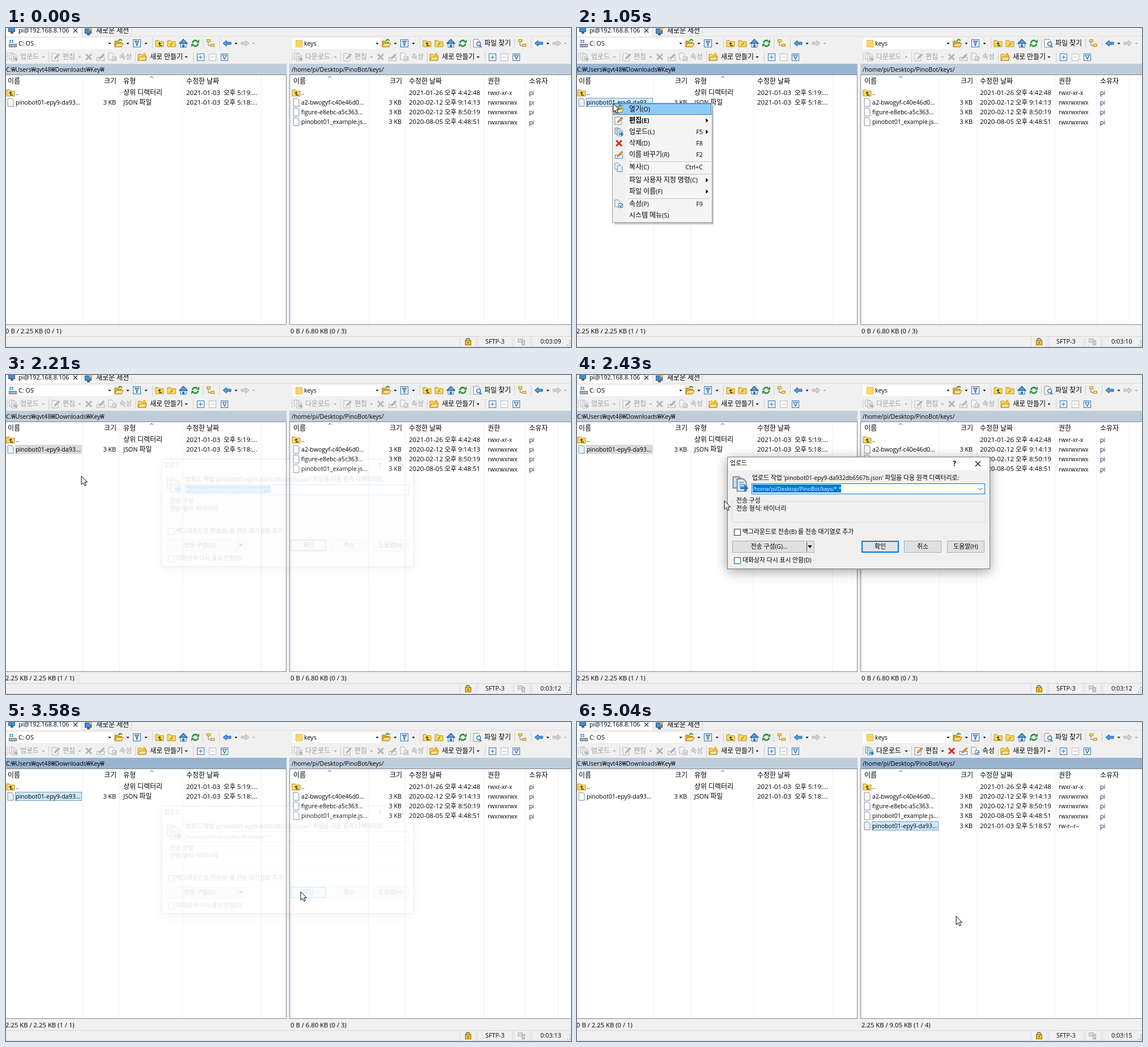
An HTML page with a canvas that plays this animation: 997x562 px, repeating every 5120 ms.

```html
<!DOCTYPE html>
<html lang="ko">
<head>
<meta charset="utf-8">
<title>File transfer</title>
<style>
html, body { margin: 0; width: 100%; height: 100%; overflow: hidden; background: #f0f0f0; }
canvas { display: block; }
</style>
</head>
<body>
<canvas id="stage" width="997" height="562"></canvas>
<script>
const W = 997, H = 562, LOOP = 5120;
const screen2d = document.getElementById('stage').getContext('2d');
const layer = document.createElement('canvas');
layer.width = W; layer.height = H;
const layer2d = layer.getContext('2d');
let g = screen2d;
let disabled = false;

const LATIN = '"Open Sans", "Noto Sans", sans-serif';
const HANGUL = '"Noto Sans CJK KR", "Noto Sans CJK", sans-serif';
const NAME = 'pinobot01-epy9-da93...';
const EDGE = '#828790';

// ---------- primitives ----------
const tone = c => disabled ? '#b4b4b4' : c;

function rect(x, y, w, h, fill, line) {
  if (fill) { g.fillStyle = fill; g.fillRect(x, y, w, h); }
  if (line) { g.strokeStyle = line; g.lineWidth = 1; g.strokeRect(x + .5, y + .5, w - 1, h - 1); }
}

function path(points, fill, line, width = 1, open = false) {
  g.beginPath();
  for (let i = 0; i < points.length; i += 2) g.lineTo(points[i], points[i + 1]);
  if (!open) g.closePath();
  if (fill) { g.fillStyle = fill; g.fill(); }
  if (line) { g.strokeStyle = line; g.lineWidth = width; g.stroke(); }
}

// Hangul and Latin runs use their own sizes; y is the middle of the line.
function text(s, x, y, { latin = 10.8, hangul = 12, color = '#000', align = 'left', bold = false } = {}) {
  const runs = (s.match(/[가-힣]+|[^가-힣]+/g) || []).map(run => {
    const korean = /[가-힣]/.test(run);
    const font = `${bold ? 'bold ' : ''}${korean ? hangul : latin}px ${korean ? HANGUL : LATIN}`;
    g.font = font;
    return { run, font, width: g.measureText(run).width };
  });
  const total = runs.reduce((sum, r) => sum + r.width, 0);
  if (align === 'right') x -= total;
  if (align === 'center') x -= total / 2;
  g.fillStyle = color;
  for (const r of runs) {
    g.font = r.font;
    g.fillText(r.run, x, y + 4);
    x += r.width;
  }
}

function at(x, y, draw, ...args) {
  g.save();
  g.translate(x, y);
  draw(...args);
  g.restore();
}

// ---------- icons, drawn around their centre ----------
const down = () => path([-2.5, -1, 2.5, -1, 0, 2], tone('#111'));
const side = () => path([-1.5, -4, 2.5, 0, -1.5, 4], '#000');

function folder(mark) {
  path([-7, -5, -2, -5, 0, -3, 7, -3, 7, 6, -7, 6], tone('#ffd95c'), tone('#b98a16'));
  if (mark === 'up') {
    path([-3, 1, 0, -2, 3, 1], tone('#333'));
    path([0, 1, 0, 4, 4, 4], null, tone('#333'), 1.3, true);
  }
  if (mark === 'root') path([-2, 4, 2, -1], null, tone('#555'), 1.2, true);
}

function openFolder() {
  path([-7, -4, -3, -4, -1, -2, 5, -2, 5, 6, -7, 6], tone('#e0ac2a'), tone('#a97a10'));
  path([-7, 6, -4, 0, 8, 0, 5, 6], tone('#ffe27d'), tone('#a97a10'));
  path([-1, -4, 2, -7, 6, -5], null, tone('#3f9b35'), 2.2, true);
}

function newFolder() {
  folder();
  path([-7, 6, -4, 0, 8, 0, 6, 6], tone('#ffe58a'), tone('#a97a10'));
  rect(2, -7, 4, 4, tone('#ffae1a'));
}

function filterBox() {
  rect(-7, -7, 14, 14, '#f4f9ff', '#2670b5');
  path([-4, -4, 4, -4, 1, 0, 1, 4, -1, 4, -1, 0], '#8eb8dc', '#305a86');
}

function home() {
  path([-5, 0, -5, 7, 5, 7, 5, 0], '#eaf4ff', '#2e6eac');
  path([-7, 0, 0, -7, 7, 0], '#62a4df', '#205c98', 1.3);
  rect(-2, 2, 4, 5, '#3b78b5');
}

function refresh() {
  for (const turn of [0, Math.PI]) {
    g.save();
    g.rotate(turn);
    g.beginPath();
    g.arc(0, 0, 5, Math.PI * 1.02, Math.PI * 1.75);
    g.strokeStyle = '#289538';
    g.lineWidth = 2.8;
    g.stroke();
    path([2, -1, 7, -1, 7, -7], '#289538');
    g.restore();
  }
}

function tree() {
  path([-4, -2, -4, 4, 2, 4], null, '#777', 1, true);
  rect(-7, -7, 7, 5, '#ffd95c', '#b98a16');
  rect(0, 1, 7, 5, '#ffd95c', '#b98a16');
}

function arrow(dir, live) {
  const p = [-7, 0, -1, -5, -1, -2, 7, -2, 7, 2, -1, 2, -1, 5];
  path(p.map((v, i) => i % 2 ? v : v * dir), live ? '#4b9be6' : '#d3d3d3', live ? '#1c5d9f' : '#b5b5b5');
}

function page(x = -5, y = -7, w = 11, h = 14, fill = '#fff') {
  path([x, y, x + w - 3, y, x + w, y + 3, x + w, y + h, x, y + h], disabled ? '#f4f4f4' : fill, tone('#7b8591'));
}

function transfer() {
  page(-7, -7, 9, 11, '#c4dff6');
  page(-3, -5, 9, 12, '#dcedfb');
  for (const y of [-2, 0, 2]) rect(-1, y, 5, 1, tone('#6ea3d2'));
  path([0, 3, 4, 3, 4, 0, 8, 4, 4, 8, 4, 5, 0, 5], tone('#2477c3'));
}

function pencil(small) {
  if (small) rect(-7, 0, 14, 7, disabled ? '#eee' : '#fff', tone('#4b83b8'));
  else page(-7, -6, 11, 13);
  path([-3, 4, -2, 1, 5, -6, 7, -4, 0, 3], tone('#f2a03d'), tone('#845421'), .8);
}

function cross() {
  path([-5, -5, 5, 5], null, tone('#d52b1e'), 3, true);
  path([5, -5, -5, 5], null, tone('#d52b1e'), 3, true);
}

function props() {
  page(-7, -7, 9, 12);
  rect(-1, -1, 8, 8, disabled ? '#eee' : '#fff', tone('#4778a8'));
  path([1, 3, 3, 5, 6, 1], null, tone('#2c66a3'), 1.3, true);
}

function signBox(sign) {
  const c = sign === '-' ? '#b9b9b9' : '#2d72b3';
  rect(-6, -6, 13, 13, '#fafdff', c);
  if (sign === 'v') path([-3, -3, 4, -3, .5, 4], null, '#1c5591', 1.2);
  else rect(-3, 0, 7, 1, c);
  if (sign === '+') rect(0, -3, 1, 7, c);
}

function monitor() {
  rect(-7, -6, 12, 9, '#3f8fd8', '#34506b');
  rect(-3, 3, 5, 3, '#56656f');
}

function find() {
  page(-7, -7, 11, 14);
  g.beginPath();
  g.arc(2, 1, 3.6, 0, 7);
  g.fillStyle = '#cfe7fb';
  g.fill();
  g.strokeStyle = '#376a99';
  g.lineWidth = 1.3;
  g.stroke();
  path([4, 4, 7, 7], null, '#376a99', 2, true);
}

function pointer(x, y) {
  path([x, y, x, y + 15, x + 3.5, y + 11.8, x + 6, y + 17, x + 8.3, y + 16, x + 6, y + 10.8, x + 10.5, y + 10.8], '#fff', '#000', 1);
}

// ---------- window ----------
const gap = (x, y) => rect(x, y - 9, 1, 18, '#cfcfcf');

function tabs() {
  rect(0, 0, 133, 14, '#fff');
  rect(133, 0, 1, 14, '#d4d4d4');
  rect(221, 0, 1, 14, '#d4d4d4');
  rect(134, 14, W - 134, 1, '#dedede');
  at(11, 4, monitor);
  text('pi@192.168.8.106', 22, 4);
  path([119, 1, 126, 8], null, '#222', 1.1, true);
  path([126, 1, 119, 8], null, '#222', 1.1, true);
  at(146, 7, monitor);
  rect(147, 0, 5, 4, '#f5b63a');
  text('새로운 세션', 159, 5);
}

function navBar(dx, right) {
  const y = 27, late = right ? 550 : 0;
  rect(right ? 505 : 0, 18, right ? 156 : 189, 19, '#fff');
  if (right) {
    rect(511, 21, 12, 13, '#ffd567', '#eab73c');
    text('keys', 526, y);
  } else {
    rect(5, 28, 14, 6, '#a7adb4', '#6d747b');
    for (let i = 0; i < 4; i++) rect(6 + i % 2 * 4, 21 + (i >> 1) * 3, 3, 2, '#2790e0');
    text('C: OS', 22, y);
  }
  at(183 + dx, y, down);
  at(199 + dx, y, openFolder);
  at(215 + dx, y, down);
  at(231 + dx, y, filterBox);
  at(247 + dx, y, down);
  gap(258 + dx, y);
  at(271 + dx, y, folder, 'up');
  at(292 + dx, y, folder, 'root');
  at(313 + dx, y, home);
  at(334 + dx, y, refresh);
  gap(347 + dx, y);
  if (right) {
    at(832, y, find);
    text('파일 찾기', 844, y);
    gap(897, y);
  }
  at(361 + late, y, tree);
  gap(376 + late, y);
  at(390 + late, y, arrow, 1, true);
  at(406 + late, y, down);
  at(422 + late, y, arrow, -1, false);
  disabled = true;
  at(437 + late, y, down);
  disabled = false;
}

function actionBar(dx, right, live) {
  const y = 51, base = right ? 503 : 0;
  for (let i = 0; i < 5; i++) rect(base + 1, 44 + i * 3, 2, 1, '#b8b8b8');
  disabled = !live;
  const color = live ? '#000' : '#9d9d9d';
  at(base + 13, y, transfer);
  text(right ? '다운로드' : '업로드', base + 25, y, { color });
  at(right ? 581 : 66, y, down);
  gap(75 + dx, y);
  at(88 + dx, y, pencil);
  text('편집', 100 + dx, y, { color });
  at(130 + dx, y, down);
  at(146 + dx, y, cross);
  at(167 + dx, y, pencil, true);
  at(188 + dx, y, props);
  text('속성', 200 + dx, y, { color });
  disabled = false;
  gap(228 + dx, y);
  at(240 + dx, y, newFolder);
  text('새로 만들기', 254 + dx, y);
  at(318 + dx, y, down);
  gap(330 + dx, y);
  at(343 + dx, y, signBox, '+');
  at(364 + dx, y, signBox, '-');
  at(385 + dx, y, signBox, 'v');
}

function pathBar(x, w, label, active) {
  rect(x, 63, w, 20, active ? '#99b4d1' : '#bfcddb');
  text(label, x ? 504 : 0, 73, { latin: 10.6 });
}

function marked(x, y, style) {
  const fill = { hover: '#e5f3ff', active: '#cce8ff', idle: '#d9d9d9' }[style];
  if (!fill) return;
  rect(x, y - 8, 118, 16, fill);
  if (style !== 'active') return;
  g.setLineDash([1, 1]);
  rect(x, y - 8, 118, 16, null, '#24506f');
  g.setLineDash([]);
}

function listFrame(x, w, columns, caret) {
  rect(x, 82, w, 441, '#fff');
  for (const c of columns) rect(c, 83, 1, 438, '#eaf2f9');
  rect(x, 82, w, 1, EDGE);
  rect(x, 522, w, 1, EDGE);
  path([caret - 3, 88, caret, 85, caret + 3, 88], null, '#555', 1, true);
}

function fileRow(y, name, date, x, style) {
  const right = x > 400;
  marked(x + 13, y, style);
  at(x + 5, y, page, -5, -7, 10, 14, style ? '#e4f2fd' : '#fff');
  text(name, x + 14, y, { latin: 10.6 });
  text('3 KB', right ? 698 : 194, y, { align: 'right' });
  text(date, right ? 711 : 318, y, { latin: 11.5, hangul: 11.4 });
}

function leftList(style) {
  listFrame(0, 495, [135, 200, 311, 450], 257);
  rect(494, 82, 1, 441, EDGE);
  text('이름', 3, 94);
  text('크기', 195, 94, { align: 'right' });
  text('유형', 207, 94);
  text('수정한 날짜', 318, 94);
  at(8, 114, folder, 'up');
  text('..', 17, 114);
  text('상위 디렉터리', 207, 114);
  text('2021-01-03  오후 5:19:...', 318, 114, { latin: 11.5, hangul: 11.4 });
  fileRow(131, NAME, '2021-01-03  오후 5:18:...', 3, style);
  text('JSON 파일', 207, 131);
}

function rightList(arrived, style) {
  listFrame(500, W - 500, [502, 639, 704, 843, 916, 974], 571);
  rect(500, 82, 1, 441, EDGE);
  rect(502, 106, 1, 415, '#d5e7f6');
  text('이름', 507, 94);
  text('크기', 699, 94, { align: 'right' });
  text('수정한 날짜', 711, 94);
  text('권한', 850, 94);
  text('소유자', 923, 94);
  at(512, 114, folder, 'up');
  text('..', 521, 114);
  text('2021-01-26 오후 4:42:48', 711, 114, { latin: 11.5, hangul: 11.4 });
  const files = [
    ['a2-bwogyf-c40e46d0...', '2020-02-12 오후 9:14:13'],
    ['figure-e8ebc-a5c363...', '2020-02-12 오후 8:50:19'],
    ['pinobot01_example.js...', '2020-08-05 오후 4:48:51']
  ];
  if (arrived) files.push([NAME, '2021-01-03 오후 5:18:57']);
  files.forEach(([name, date], i) => fileRow(131 + i * 17.4 | 0, name, date, 507, i === 3 && style));
  const rights = ['rwxr-xr-x', ...files.map((f, i) => i < 3 ? 'rwxrwxrwx' : 'rw-r--r--')];
  rights.forEach((r, i) => {
    const y = 114 + i * 17.4 | 0;
    text(r, 850, y, { latin: 10.2 });
    text('pi', 923, y, { color: '#281540' });
  });
}

function statusBar(clock) {
  rect(0, 543, W, 1, '#d7d7d7');
  for (const x of [801, 829, 832, 893, 896, 924, 927]) rect(x, 545, 1, 16, '#dadada');
  rect(0, 561, W, 1, '#dcdcdc');
  g.beginPath();
  g.arc(815, 550, 3, Math.PI, 0);
  g.strokeStyle = '#8a7440';
  g.lineWidth = 1.8;
  g.stroke();
  rect(810, 550, 11, 9, '#f3b62d', '#9c6c0d');
  rect(815, 553, 1, 3, '#704c08');
  text('SFTP-3', 846, 552);
  rect(903, 547, 9, 7, '#d9d9d9', '#b0b0b0');
  rect(910, 550, 6, 9, '#d0d0d0', '#a9a9a9');
  text('0:03:' + String(clock).padStart(2, '0'), 943, 552);
  for (let i = 0; i < 3; i++) rect(994, 550 + i * 4, 2, 2, '#b5b5b5');
  rect(990, 558, 2, 2, '#b5b5b5');
}

// ---------- context menu ----------
const MENU = [
  [143, '열기(O)', '', openFolder],
  [163, '편집(E)', '>', pencil],
  [183, '업로드(L)', 'F5>', transfer],
  [203, '삭제(D)', 'F8', cross],
  [223, '이름 바꾸기(R)', 'F2', () => pencil(true)],
  [245, '복사(C)', 'Ctrl+C', () => { page(-7, -7, 9, 11); page(-3, -3, 9, 11, '#dcecfb'); }],
  [268, '파일 사용자 지정 명령(C)', '>'],
  [288, '파일 이름(F)', '>'],
  [310, '속성(P)', 'F9', props],
  [330, '시스템 메뉴(S)', '']
];

function contextMenu(pointerY) {
  rect(66, 136, 175, 210, 'rgba(0,0,0,.22)');
  rect(62, 132, 177, 211, '#f5f5f5', '#9b9b9b');
  rect(64, 134, 22, 207, '#f0f0f0');
  for (const y of [235, 257, 300]) rect(90, y, 146, 1, '#c9c9c9');
  for (const [y, label, extra, icon] of MENU) {
    const key = extra.replace('>', '');
    if (Math.abs(pointerY - y) <= 10) {
      rect(64, y - 10, 173, 20, '#91c9f7', '#2685cf');
      if (extra === 'F5>') rect(224, y - 9, 1, 18, '#2685cf');
    }
    if (icon) at(74, y, icon);
    text(label, 92, y, { bold: y === 163 });
    if (key) text(key, 222, y, { align: 'right' });
    if (extra.endsWith('>')) at(229, y, side);
  }
}

// ---------- upload dialog ----------
const SMALL = { latin: 10.2, hangul: 10.9 };

function button(x, w, label, edge = '#adadad', fill = '#e1e1e1') {
  rect(x, 292, w, 21, fill, edge);
  if (edge !== '#adadad') rect(x + 1, 293, w - 2, 19, null, edge);
  text(label, x + w / 2, 302, { ...SMALL, align: 'center' });
}

function checkbox(y, label, edge) {
  rect(277, y - 6, 12, 12, '#fff', edge);
  text(label, 292, y - 1, SMALL);
}

function dialog(closing, pressed) {
  g.save();
  g.shadowColor = 'rgba(0,0,0,.38)';
  g.shadowBlur = 20;
  g.shadowOffsetY = 4;
  rect(265, 144, 464, 198, '#f0f0f0');
  g.restore();
  rect(265, 144, 464, 198, '#f0f0f0', '#787878');
  rect(266, 145, 462, 23, '#fff');
  text('업로드', 270, 155, SMALL);
  text('?', 666, 156, { latin: 12, align: 'center', bold: true });
  path([703, 152, 712, 161], null, '#111', 1.2, true);
  path([712, 152, 703, 161], null, '#111', 1.2, true);
  g.save();
  g.translate(288, 192);
  g.scale(1.8, 1.8);
  transfer();
  g.restore();
  text("업로드 작업 'pinobot01-epy9-da932db6567b.json' 파일을 다음 원격 디렉터리로:", 309, 181, SMALL);
  rect(308, 191, 412, 19, '#fff', closing ? '#9a9a9a' : '#0078d7');
  if (!closing) rect(310, 193, 156, 14, '#0078d7');
  text('/home/pi/Desktop/PinoBot/keys/*.*', 310, 200, { latin: 9.4, color: closing ? '#000' : '#fff' });
  path([708, 199, 711.5, 202.5, 715, 199], null, '#444', 1, true);
  rect(273, 222, 448, 38, null, '#dcdcdc');
  rect(279, 220, 46, 4, '#f0f0f0');
  text('전송 구성', 281, 221, SMALL);
  text('전송 형식: 바이너리', 281, 235, SMALL);
  checkbox(277, '백그라운드로 전송(B) 를 전송 대기열로 추가', '#333');
  checkbox(327, '대화상자 다시 표시 안함(D)', '#1c5a96');
  button(274, 145, '');
  text('전송 구성(G)...', 339, 302, { ...SMALL, align: 'center' });
  rect(405, 294, 1, 17, '#555');
  path([407, 300, 415, 300, 411, 305], '#111');
  button(502, 66, '확인', '#0078d7', pressed ? '#cce4f7' : '#e1e1e1');
  button(577, 66, '취소');
  button(653, 66, '도움말(H)');
}

function fadedDialog(amount, closing, pressed) {
  g = layer2d;
  g.clearRect(0, 0, W, H);
  dialog(closing, pressed);
  g = screen2d;
  const scale = .955 + .045 * amount;
  g.save();
  g.globalAlpha = amount;
  g.translate(497, 243);
  g.scale(scale, scale);
  g.drawImage(layer, -497, -243);
  g.restore();
}

// ---------- timeline ----------
const ROUTE = [
  [70, 150, 330], [560, 64, 133], [1130, 64, 133], [1350, 120, 204], [1430, 140, 186],
  [1510, 136, 175], [1660, 133, 178], [2210, 133, 178], [2290, 205, 205], [2810, 510, 297],
  [3040, 519, 302], [3400, 520, 299], [3860, 520, 299], [4260, 600, 188], [4660, 600, 181], [5040, 669, 342]
];
const CLICKS = [[620, 800], [960, 1050], [1820, 1890], [3270, 3420], [4340, 4480]];
const TICKS = [140, 1110, 2110, 3030, 4040, 4980];
const clamp = v => Math.max(0, Math.min(1, v));

function pointerAt(t) {
  const i = ROUTE.findIndex(k => k[0] > t);
  if (i < 0) return ROUTE[ROUTE.length - 1].slice(1);
  const [t0, x0, y0] = ROUTE[i - 1], [t1, x1, y1] = ROUTE[i];
  const p = (t - t0) / (t1 - t0), e = p * p * (3 - 2 * p);
  return [x0 + (x1 - x0) * e, y0 + (y1 - y0) * e];
}

function draw(t) {
  const within = (a, b) => t >= a && t < b;
  const shown = t >= 70;
  const [px, py] = shown ? pointerAt(t) : [-50, -50];
  const leftActive = within(645, 1890) || within(3430, 4340);
  const leftStyle = leftActive ? 'active' : within(1890, 3430) ? 'idle' : within(500, 645) ? 'hover' : '';
  const leftPicked = within(645, 4340);
  const rightActive = t >= 4340;
  const arrived = t >= 4190, picked = t >= 4480;

  rect(0, 0, W, H, '#f0f0f0');
  tabs();
  navBar(0, false);
  navBar(472, true);
  actionBar(0, false, within(3890, 4650));
  actionBar(515, true, t >= 4650);
  pathBar(0, 495, 'C:₩Users₩qvt48₩Downloads₩Key₩', leftActive);
  pathBar(500, W - 500, '/home/pi/Desktop/PinoBot/keys/', rightActive);
  leftList(leftStyle);
  rightList(arrived, picked ? 'active' : rightActive ? 'hover' : '');
  text(`${leftPicked ? '2.25 KB' : '0 B'} / 2.25 KB (${leftPicked ? 1 : 0} / 1)`, -1, 534, { latin: 11.3 });
  text(`${picked ? '2.25 KB' : '0 B'} / ${arrived ? '9.05' : '6.80'} KB (${picked ? 1 : 0} / ${arrived ? 4 : 3})`, 502, 534, { latin: 11.3 });
  statusBar(9 + TICKS.filter(k => t >= k).length);

  if (within(1050, 1870)) contextMenu(py);
  if (within(2180, 3600)) {
    const closing = t >= 3430;
    const amount = closing ? 1 - (t - 3430) / 170 : (t - 2180) / 250;
    fadedDialog(clamp(amount), closing, t >= 3270);
  }
  if (!shown) return;
  if (CLICKS.some(([a, b]) => within(a, b))) {
    g.beginPath();
    g.arc(px, py, 10, 0, Math.PI * 2);
    g.fillStyle = 'rgba(245,230,20,.6)';
    g.fill();
  }
  pointer(px, py);
}

const start = performance.now();
function tick() {
  draw((performance.now() - start) % LOOP);
  requestAnimationFrame(tick);
}
tick();
</script>
</body>
</html>
```
